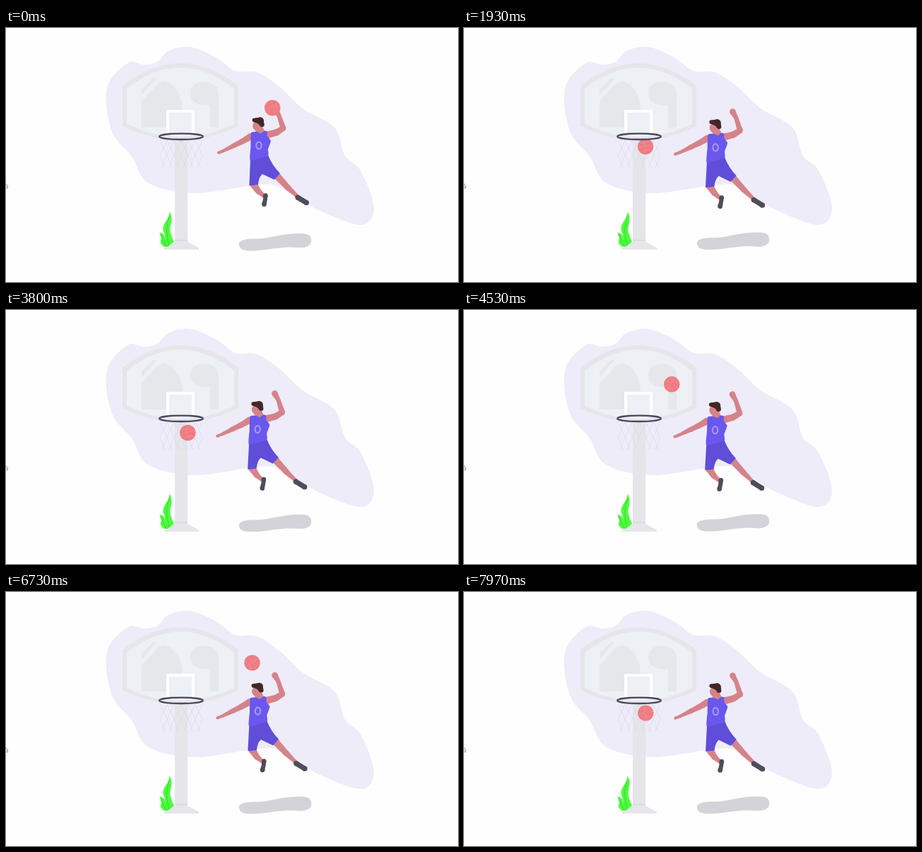
Animation, 640 px wide and 360 px high, one loop 8 s. Source, as an HTML page with a canvas:

```html
<!DOCTYPE html>
<html lang="en">
<head>
<meta charset="utf-8">
<title>Basketball shot</title>
<style>
  html, body { margin: 0; width: 100%; height: 100%; overflow: hidden; background: #fefefe; }
  canvas { display: block; width: 640px; height: 360px; }
  svg { position: absolute; left: 0; top: 0; }
</style>
</head>
<body>
<canvas id="stage"></canvas>
<svg width="0" height="0">
  <path id="flight" fill="none" d="M377.7 113.5Q357 99 335 99Q257 99 257 165Q257 190 268 210"/>
</svg>
<script>
const canvas = document.getElementById('stage');
const ctx = canvas.getContext('2d');
const flight = document.getElementById('flight');
const flightLength = flight.getTotalLength();
const ratio = window.devicePixelRatio || 1;
canvas.width = 640 * ratio;
canvas.height = 360 * ratio;

const LOOP = 8000, SWAY = 1500, SHOT = 3000, LEAD = 100;
const SKIN = '#d5838a', JERSEY = '#6a57ee', SHORTS = '#604dd8', SHOE = '#4e4d59';
const GREY = '#e5e5ea', GLASS = '#edf0f4', SHADE = '#e5e7eb';

const ease = p => p < .5 ? 2 * p * p : 1 - 2 * (1 - p) ** 2;

// Eased there-and-back progress, each way lasting the given time
function pingPong(time, duration) {
  const p = time / duration % 2;
  return ease(p < 1 ? p : 2 - p);
}

function fill(path, color) {
  ctx.fillStyle = color;
  ctx.fill(new Path2D(path));
}

function stroke(path, color, width) {
  ctx.strokeStyle = color;
  ctx.lineWidth = width;
  ctx.stroke(new Path2D(path));
}

function ellipse(x, y, rx, ry, from = 0, to = Math.PI * 2) {
  ctx.beginPath();
  ctx.ellipse(x, y, rx, ry, 0, from, to);
}

// Closed smooth curve through points
function blob(color, points, tension = 1) {
  const n = points.length, c = tension / 6;
  const at = i => points[(i + n) % n];
  ctx.beginPath();
  ctx.moveTo(...points[0]);
  for (let i = 0; i < n; i++) {
    const a = at(i - 1), b = at(i), d = at(i + 1), e = at(i + 2);
    const lead = k => b[k] + (d[k] - a[k]) * c;
    const trail = k => d[k] - (e[k] - b[k]) * c;
    ctx.bezierCurveTo(lead(0), lead(1), trail(0), trail(1), ...d);
  }
  ctx.fillStyle = color;
  ctx.fill();
}

// Tapered chain of joints: x, y, radius
function limb(color, ...joints) {
  ctx.fillStyle = color;
  joints.forEach(([x, y, r], i) => {
    ellipse(x, y, r, r);
    ctx.fill();
    if (!i) return;
    const [px, py, pr] = joints[i - 1];
    const length = Math.hypot(x - px, y - py);
    const nx = (py - y) / length, ny = (x - px) / length;
    ctx.beginPath();
    ctx.moveTo(px + nx * pr, py + ny * pr);
    ctx.lineTo(x + nx * r, y + ny * r);
    ctx.lineTo(x - nx * r, y - ny * r);
    ctx.lineTo(px - nx * pr, py - ny * pr);
    ctx.fill();
  });
}

function drawBackdrop() {
  ctx.fillStyle = '#fefefe';
  ctx.fillRect(0, 0, 640, 360);
  blob('#edecf8', [[142, 108], [147, 75], [174, 49], [195, 52], [214, 48], [231, 32],
    [262, 27], [298, 42], [325, 61], [356, 63], [388, 84], [420, 114], [465, 141],
    [480, 181], [502, 202], [521, 255], [502, 279], [440, 257], [388, 226],
    [358, 222], [268, 234], [202, 220], [178, 182], [152, 151]]);
  stroke('M0 220.5L3 225H1L2 228', '#777', .8);
}

function drawBoard() {
  fill('M165 82Q247 18 329 82V139Q247 179 165 139Z', GREY);
  fill('M171 86Q247 26 323 86V136Q247 173 171 136Z', GLASS);
  fill('M192 141V104L216 78Q229 71 240 86Q250 98 250 117V141Z', SHADE);
  fill('M192 87L208 71H213L192 96Z', SHADE);
  fill('M289 141V109Q261 111 261 92Q262 76 282 76Q301 79 301 93V141Z', SHADE);
  ctx.fillStyle = GLASS;
  ctx.fillRect(229, 118, 36, 31);
  stroke('M229 149V118H265V149', '#fff', 4);
}

function drawPole() {
  ctx.fillStyle = GREY;
  ctx.fillRect(239, 158, 18, 145);
  fill('M239 303H257L273 311.5V314H224V311.5Z', GREY);
  ctx.fillStyle = '#d5d5da';
  ctx.fillRect(239, 300.5, 18, 1.3);
}

function drawNet() {
  for (let x = 218; x < 278; x += 10) {
    stroke(`M${x} 159l10 21l-7 18M${x + 10} 159l-10 21l7 18`, '#dcdce4', .7);
  }
}

function drawRim(from, to) {
  ellipse(248, 153.8, 31, 4.2, from, to);
  ctx.strokeStyle = '#4d465f';
  ctx.lineWidth = 2.3;
  ctx.stroke();
}

function drawPlant() {
  fill('M231.5 260.5C239 273 230 281 233 290Q235 298 238 303L229 310H223Q228 297 223 288C220 277 231 273 231.5 260.5Z', '#4dfc3d');
  fill('M217.5 290Q225 290 226 301L229 310H224Q216 305 220 299Z', '#4dfc3d');
  stroke('M231.5 266Q224 285 231 308M220 293Q222 302 227 309', '#33cf31', .8);
}

function drawShadow(sway) {
  ctx.save();
  ctx.translate(0, -2 * sway);
  blob('#d4d3d9', [[330, 305], [340, 299.5], [365, 298], [400, 292], [427, 292.5],
    [432, 304], [422, 311], [395, 311], [355, 315.5], [335, 314]]);
  ctx.restore();
}

function drawPlayer(sway) {
  ctx.save();
  ctx.translate(142, 27);
  ctx.rotate(sway * Math.PI / 180);
  ctx.translate(-142, -27);

  limb(SKIN, [384, 210, 5], [399, 226, 4], [412, 238, 2.6]);
  limb(SKIN, [351, 222, 5.2], [357, 231, 4.2], [365, 238, 2.6]);
  limb(SHOE, [367.5, 237.5, 3.3], [367, 243, 2.8], [365.5, 250, 3.3]);
  limb(SHOE, [413, 240, 3.6], [425.5, 247.5, 3.6]);

  limb(SKIN, [346, 154, 4.8], [334, 161, 3.9], [323, 166.5, 3.4], [308, 174, 2.2], [301, 176.8, 2]);
  limb(SKIN, [372, 151, 5], [383, 148, 4.6], [392.5, 142, 4], [386.5, 124, 3], [381.5, 115.5, 4.3]);
  limb(SKIN, [355.5, 138.5, 6.3], [361, 147, 5]);
  limb('#432728', [351.5, 130.5, 2.8], [360, 131.5, 5], [362.5, 137, 3.3]);

  fill('M346 187L371 180Q377 195 388 206L380 215L363 207Q358 211 357 222L344.5 223.5Z', SHORTS);
  blob(JERSEY, [[347, 148.5], [355, 147], [361, 149.5], [366, 145.5], [370, 147],
    [370, 153], [375, 160], [371, 172], [371, 181], [346, 188], [346.5, 168]], .4);
  ellipse(358, 166.5, 3.7, 5);
  ctx.strokeStyle = '#a195f2';
  ctx.lineWidth = 2.3;
  ctx.stroke();
  ctx.restore();
}

function drawBall(progress) {
  const { x, y } = flight.getPointAtLength(progress * flightLength);
  ctx.save();
  ctx.translate(x, y);
  ellipse(0, 0, 11.2, 11.2);
  ctx.fillStyle = '#f27a81';
  ctx.fill();
  ctx.rotate(-.2 - progress * 2);
  stroke('M-11 0Q0 -3 11 0M0 -11Q3 0 0 11M-8 -7.5Q-1 0 -8 7.5M8 -7.5Q2 0 8 7.5', '#dd9a9e', .7);
  ctx.restore();
}

function draw(time) {
  const t = time % LOOP + LEAD;
  const sway = pingPong(t, SWAY);
  ctx.setTransform(ratio, 0, 0, ratio, 0, 0);
  drawBackdrop();
  drawBoard();
  drawPole();
  drawNet();
  drawRim(Math.PI, Math.PI * 2);
  drawPlant();
  drawShadow(sway);
  drawPlayer(sway);
  drawBall(pingPong(t, SHOT));
  drawRim(0, Math.PI);
}

const start = performance.now();
function tick() {
  draw(performance.now() - start);
  requestAnimationFrame(tick);
}
tick();
</script>
</body>
</html>
```
